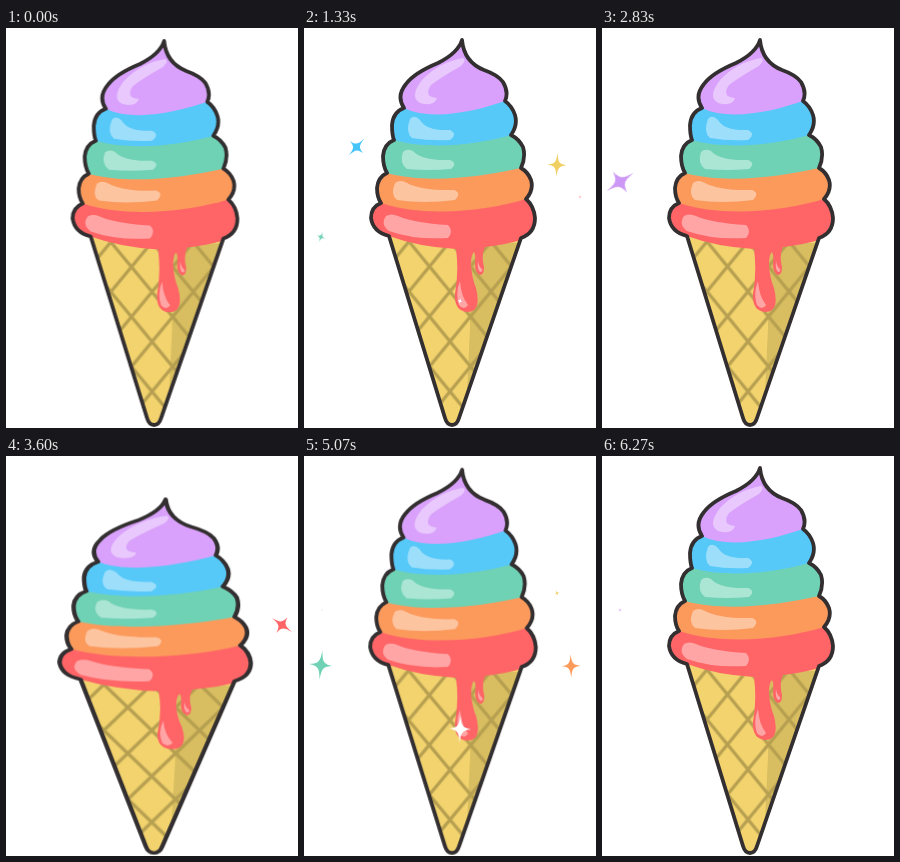
An HTML page that plays this animation: 292x400 px, repeating every 6.33 s.

```html
<!DOCTYPE html>
<html lang="en">
<head>
<meta charset="utf-8">
<title>Rainbow ice cream</title>
<style>
  :root { --loop: 3165ms; }
  html, body { margin: 0; width: 100%; height: 100%; overflow: hidden; background: #fff; }
  svg { display: block; width: 100%; height: 100%; }

  .cone {
    transform-origin: 148px 397px;
    animation: jelly var(--loop) cubic-bezier(.37, 0, .63, 1) infinite;
  }
  /* Squash, spring up, settle. */
  @keyframes jelly {
    0% { transform: scale(1, 1); animation-timing-function: cubic-bezier(.3, .3, .6, 1); }
    20.5% { transform: scale(1.196, .904); }
    41%, 44.2% { transform: scale(1, 1); }
    51.8% { transform: scale(.945, 1.04); }
    61.3% { transform: scale(1.012, .994); }
    71.7% { transform: scale(.99, 1.006); }
    82.1%, 100% { transform: scale(1, 1); }
  }

  .star {
    scale: 0;
    animation: twinkle var(--loop) infinite, turn var(--loop) linear infinite;
    animation-delay: calc(var(--start) - var(--loop));
  }
  @keyframes twinkle {
    0% { scale: 0; animation-timing-function: cubic-bezier(.39, .575, .565, 1); }
    19.9% { scale: var(--size); animation-timing-function: cubic-bezier(.47, 0, .745, .715); }
    39.8%, 100% { scale: 0; }
  }
  @keyframes turn {
    0% { rotate: var(--angle); }
    39.8%, 100% { rotate: calc(var(--angle) + 360deg); }
  }
</style>
</head>
<body>
<svg viewBox="0 0 292 400">
  <defs>
    <path id="shape" d="M85 208L141 390Q143 397 148 397Q153 397 155 390L217 210
      Q231 205 231 190Q230 178 222 171Q230 162 227 152Q224 144 217 140
      Q222 129 219 119Q215 111 207 107Q214 97 211 87Q208 78 201 73
      Q205 64 199 54Q194 47 180 42Q160 34 158 12
      Q154 25 134 35Q110 45 102 56Q92 68 100 80
      Q89 84 88 97Q88 107 90 112Q80 116 79 128Q79 138 83 145
      Q74 149 73 160Q73 169 77 175Q67 179 67 190Q69 204 85 208Z"/>
    <clipPath id="inside"><use href="#shape"/></clipPath>
    <pattern id="waffle" x="125.5" y="238.5" width="41" height="50" patternUnits="userSpaceOnUse">
      <path d="M-4-5L45 55M45-5L-4 55M-4 5L4-5M37 55L45 45M37-5L45 5M-4 45L4 55"
        stroke="#b69f50" stroke-width="3.2"/>
    </pattern>
    <path id="star" d="M0-1C.08-.22 .17-.09 .8 0C.17 .09 .08 .22 0 1
      C-.08 .22-.17 .09-.8 0C-.17-.09-.08-.22 0-1Z"/>
  </defs>

  <g class="cone">
    <g clip-path="url(#inside)">
      <path fill="#f2d36e" d="M60 195H240V400H60Z"/>
      <path fill="#d8be60" d="M166 215H222V365H163L166 300Z"/>
      <path fill="url(#waffle)" d="M60 195H240V400H60Z"/>
      <path fill="#ff6567" d="M60 0H240V202Q229 209 217 212Q200 217 181 219Q177 227 180 239
        Q180 247 176 247Q171 245 171 236Q172 227 170 224Q167 226 167 238Q168 250 172 260
        Q178 284 163 284Q150 283 151 266Q155 244 152 221Q115 219 85 208L60 200Z"/>
      <path fill="#fc9a5c" d="M60 0H240V162L222 171C180 184 118 189 77 175L60 169Z"/>
      <path fill="#6fd2b5" d="M60 0H240V132L217 140C178 149 122 156 83 145L60 139Z"/>
      <path fill="#56c9f9" d="M60 0H240V96L207 107C172 117 125 122 90 112L60 104Z"/>
      <path fill="#d9a1fb" d="M60 0H240V59L201 73C170 84 126 93 100 80L60 66Z"/>
      <g fill="#fff" opacity=".42">
        <path d="M159 30Q135 34 118 52Q105 69 116 75Q130 79 133 70Q119 69 127 57Q139 48 157 38Q163 32 159 30Z"/>
        <path d="M106 91Q101 104 108 110Q125 113 146 112Q154 106 146 102Q122 103 116 92Q110 86 106 91Z"/>
        <path d="M99 124Q95 135 103 141Q125 143 147 141Q154 135 146 132Q118 133 109 123Q103 120 99 124Z"/>
        <path d="M91 155Q86 167 93 172Q120 176 151 172Q158 165 150 162Q118 163 103 155Q96 151 91 155Z"/>
        <path d="M82 188Q76 196 85 203Q110 212 144 210Q150 203 144 197Q110 195 94 188Q87 185 82 188Z"/>
        <path d="M156 253Q151 265 155 277Q160 283 164 277Q157 268 156 253Z"/>
        <path d="M174 233Q173 241 176 244Q179 244 178 241Q175 239 174 233Z"/>
      </g>
    </g>
    <use href="#shape" fill="none" stroke="#332f31" stroke-width="3.8" stroke-linejoin="round"/>
  </g>

  <g id="stars"></g>
</svg>
<script>
  // x, y, colour, start in ms, largest radius, first angle
  const stars = [
    [276, 169, '#ff6567', 120, 16.5, 35],
    [52.5, 119, '#45c4fa', 500, 12.8, -15],
    [253, 137, '#f0cf63', 765, 12, 21],
    [17, 209, '#6fd2b5', 1180, 15, -22],
    [156, 273, '#ffffff', 1230, 14, -11],
    [267, 210, '#fc9a5c', 1475, 13, 55],
    [18, 154, '#cd98f5', 1890, 23, -33],
  ];
  document.getElementById('stars').innerHTML = stars.map(([x, y, color, start, size, angle]) =>
    `<g transform="translate(${x} ${y})"><use class="star" href="#star" fill="${color}"
      style="--start:${start}ms;--size:${size};--angle:${angle}deg"/></g>`).join('');
</script>
</body>
</html>
```
